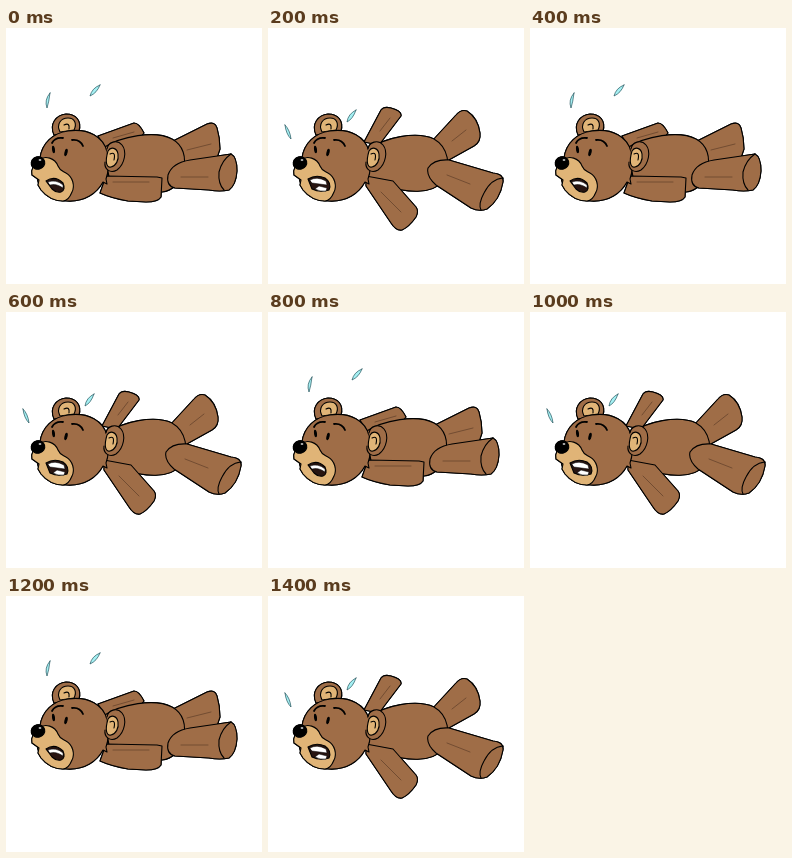
Write an HTML page that moves like this. It is 256 px wide and 256 px high and loops after 1600 ms.

```html
<!DOCTYPE html>
<html>
<head>
<meta charset="utf-8">
<title>Bear tantrum</title>
<style>
html, body { margin: 0; width: 100%; height: 100%; overflow: hidden; background: #fff; }
svg { display: block; width: 100vw; height: 100vh; }
path, ellipse { stroke: #000; stroke-width: 1.1; stroke-linejoin: round; stroke-linecap: round; }
.bear { filter: drop-shadow(.5px .8px 0 #000); }
.fur { fill: #9f6d47; }
.tan { fill: #e0b477; }
.line { fill: none; }
.brow { fill: none; stroke-width: 1.8; }
.fold { fill: none; stroke: #68452c; stroke-width: .8; }
.drop { fill: #a5f0f3; stroke: #24535c; stroke-width: .7; }
</style>
</head>
<body>
<svg viewBox="0 0 256 256">
  <defs>
    <g id="head">
      <path class="fur" d="M48 107C43 96 50 87 60 86C70 86 76 93 73 103Z"/>
      <path class="tan" d="M54 104C50 96 55 90 62 90C69 90 71 96 68 102Z"/>
      <path class="line" d="M58 97Q64 94 63 101"/>
      <path class="fur" d="M34 130C36 115 47 105 62 103C82 100 98 109 101 124C103 136 102 146 100 151L101 156L97 154C91 165 79 174 61 173C43 173 31 164 31 145Z"/>
      <path class="tan" d="M33 132C39 127 49 130 52 138C54 143 57 143 60 145C67 149 69 158 66 164C64 169 61 173 57 173C47 173 40 168 35 162L32 157L33 152L26 147Q25 143 27 139Z"/>
      <ellipse cx="32" cy="135" rx="6.8" ry="6.2" transform="rotate(-15 32 135)"/>
      <ellipse cx="34" cy="132" rx="1.4" ry=".8" fill="#fff" style="stroke:none"/>
      <path class="brow" d="M46 115Q49 109 57 110M66 112Q74 111 77 118"/>
      <ellipse cx="47.5" cy="121.5" rx=".9" ry="3.2" transform="rotate(-8 47.5 121.5)"/>
      <ellipse cx="60" cy="124.5" rx="1" ry="3.2" transform="rotate(12 60 124.5)"/>
    </g>
    <g id="ear">
      <path class="fur" d="M101 121C102 114 111 111 116 117C121 123 119 136 111 142C104 146 98 141 99 134"/>
      <path class="tan" d="M102 123C105 118 111 120 112 126C113 132 110 138 105 139C100 140 99 133 102 123Z"/>
      <path class="line" d="M104 126Q110 123 108 132"/>
    </g>
  </defs>

  <g id="down">
    <path class="drop" d="M44 65Q38 72 41 80Q43 74 44 65Z"/>
    <path class="drop" d="M94 57Q86 60 84 68Q91 65 94 57Z"/>
    <g class="bear">
      <path class="fur" d="M92 108L128 95Q133 95 138 105L132 112L100 122Z"/>
      <path class="fold" d="M107 110L128 104"/>
      <path class="fur" d="M165 114L201 96Q209 93 211 100Q214 110 214 121L211 130L176 135Z"/>
      <path class="fold" d="M181 122L205 116"/>
      <path class="fur" d="M97 120C115 108 149 102 166 111C177 117 181 129 177 143C173 156 166 163 156 164L105 158Z"/>
      <path class="fur" d="M162 147Q166 135 184 132Q205 129 225 126Q231 129 231 143Q230 157 223 162Q214 164 203 162L169 160Q160 158 162 147Z"/>
      <path class="line" d="M225 126Q216 132 213 144Q212 156 218 162"/>
      <path class="fold" d="M175 149L202 149"/>
      <path class="fur" d="M100 148L151 149L156 150L155 169Q152 174 140 174L122 173Q105 170 94 165Z"/>
      <path class="fold" d="M107 154L143 154"/>
      <use href="#head"/>
      <path d="M40 153Q49 147 57 155Q60 162 55 164Q50 165 46 161Z" fill="#281511"/>
      <path d="M42 154Q50 151 57 157L57 160Q50 155 44 157Z" fill="#fff" style="stroke-width:.5"/>
      <use href="#ear"/>
    </g>
  </g>

  <g id="up">
    <path class="drop" d="M17 97Q18 106 23 111Q22 102 17 97Z"/>
    <path class="drop" d="M88 82Q80 86 79 94Q85 91 88 82Z"/>
    <g class="bear">
      <path class="fur" d="M96 114L113 82Q116 78 123 80Q134 83 133 88L111 117Z"/>
      <path class="fold" d="M112 103L122 90"/>
      <path class="fur" d="M164 113L188 87Q193 81 199 83Q210 90 212 105Q213 114 206 118L179 133Z"/>
      <path class="fold" d="M184 113L198 102"/>
      <path class="fur" d="M100 122C116 109 149 103 166 111C180 119 184 138 175 153C164 167 138 165 116 157L99 148Z"/>
      <path class="fur" d="M160 140Q166 131 181 132L225 145Q236 146 235 154Q232 172 219 181Q211 184 203 180L168 157Q158 148 160 140Z"/>
      <path class="line" d="M235 150Q223 151 216 165Q210 176 213 182"/>
      <path class="fold" d="M179 147L202 156"/>
      <path class="fur" d="M98 148L125 153L148 179Q151 183 148 189Q141 199 134 202Q128 203 123 195L98 158Z"/>
      <path class="fold" d="M113 164L133 184"/>
      <use href="#head"/>
      <path d="M40 151Q48 146 57 150Q64 155 61 162Q52 165 44 161Z" fill="#281511"/>
      <path d="M42 152Q49 148 58 153L59 157L44 155ZM47 161L51 158L59 160L58 163Q52 164 47 161Z" fill="#fff" style="stroke-width:.5"/>
      <use href="#ear" x="-1"/>
    </g>
  </g>
</svg>
<script>
const poses = ["down", "up"].map(id => document.getElementById(id));
const HOLD = 200;

function draw(time) {
  const active = Math.floor(time / HOLD) % poses.length;
  poses.forEach((pose, i) => pose.style.display = i === active ? "" : "none");
}

function tick() {
  draw(performance.now());
  requestAnimationFrame(tick);
}
tick();
</script>
</body>
</html>
```
